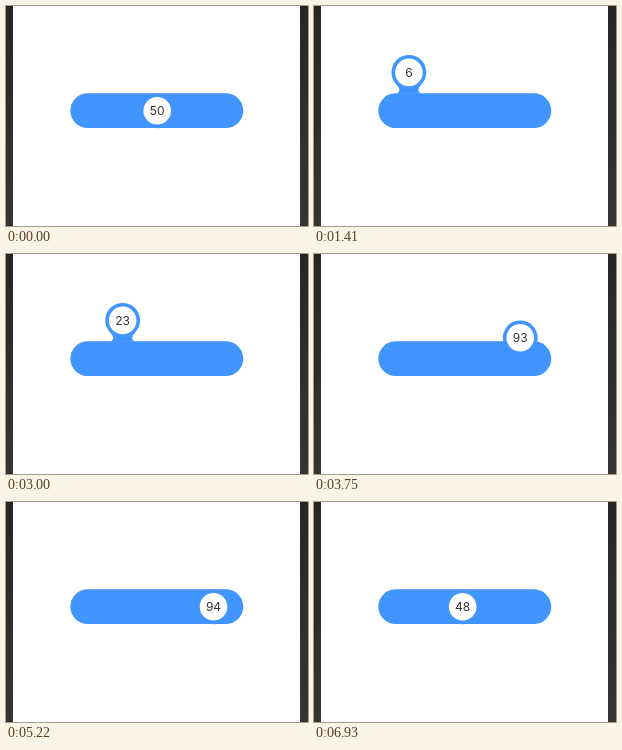
An HTML page that plays this animation: 302x220 px, repeating every 7.11 s.

```html
<!DOCTYPE html>
<html lang="en">
<head>
<meta charset="utf-8">
<title>Fluid slider</title>
<style>
  html, body { margin: 0; width: 100%; height: 100%; overflow: hidden; background: #fff; }
  svg { display: block; width: 302px; height: 220px; }
  text { font: 12px Inter, "Liberation Sans", sans-serif; fill: #333; text-anchor: middle; }
</style>
</head>
<body>
<svg viewBox="0 0 302 220">
  <defs>
    <linearGradient id="edge" x2="0" y2="1">
      <stop stop-color="#262626"/>
      <stop offset="1" stop-color="#353535"/>
    </linearGradient>
  </defs>
  <rect width="302" height="220" fill="#fff"/>
  <rect width="7" height="220" fill="url(#edge)"/>
  <rect x="294" width="8" height="220" fill="url(#edge)"/>
  <g fill="#4195ff">
    <rect x="64.3" y="87.3" width="173" height="34.8" rx="17.4"/>
    <g id="knob">
      <path id="neck"/>
      <circle r="17.4"/>
      <circle r="13.8" fill="#fff"/>
      <text id="label" y="4.4"></text>
    </g>
  </g>
</svg>
<script>
const LOOP = 7110, LIFT_TIME = 322;
const CENTER_X = 151.2, REST_Y = 104.8, LIFT = 38.4, BAR_TOP = 87.8;

// Finger down and up, in ms
const presses = [[720, 3600], [4295, 4895], [5645, 6605]];
// Drags: start and duration in ms, value reached
const drags = [
  [750, 590, 6], [1950, 120, 83.5], [2190, 120, 89], [2550, 210, 7],
  [2910, 330, 93], [4300, 100, 94], [6060, 390, 48]
];

const [knob, neck, label] = ["knob", "neck", "label"].map(id => document.getElementById(id));

function ease(t, start, duration) {
  const p = Math.min(1, Math.max(0, (t - start) / duration));
  return p * p * (3 - 2 * p);
}

const valueAt = t => drags.reduce(
  (value, [start, duration, end]) => value + (end - value) * ease(t, start, duration), 50);

const liftAt = t => presses.reduce(
  (sum, [down, up]) => sum + ease(t, down, LIFT_TIME) - ease(t, up, LIFT_TIME), 0);

function draw(t) {
  const value = valueAt(t);
  const x = CENTER_X + (value - 50) * 1.28;
  const y = REST_Y - LIFT * liftAt(t);
  const base = BAR_TOP - y;
  const waist = Math.min(17.7, base - 1);

  knob.setAttribute("transform", `translate(${x} ${y})`);
  neck.setAttribute("d", base > 12.7
    ? `M-12 12.7Q-7 ${waist} -12 ${base}H12Q7 ${waist} 12 12.7Z` : "");
  label.textContent = Math.round(value);
}

const start = performance.now();
function tick() {
  draw((performance.now() - start) % LOOP);
  requestAnimationFrame(tick);
}
tick();
</script>
</body>
</html>
```
